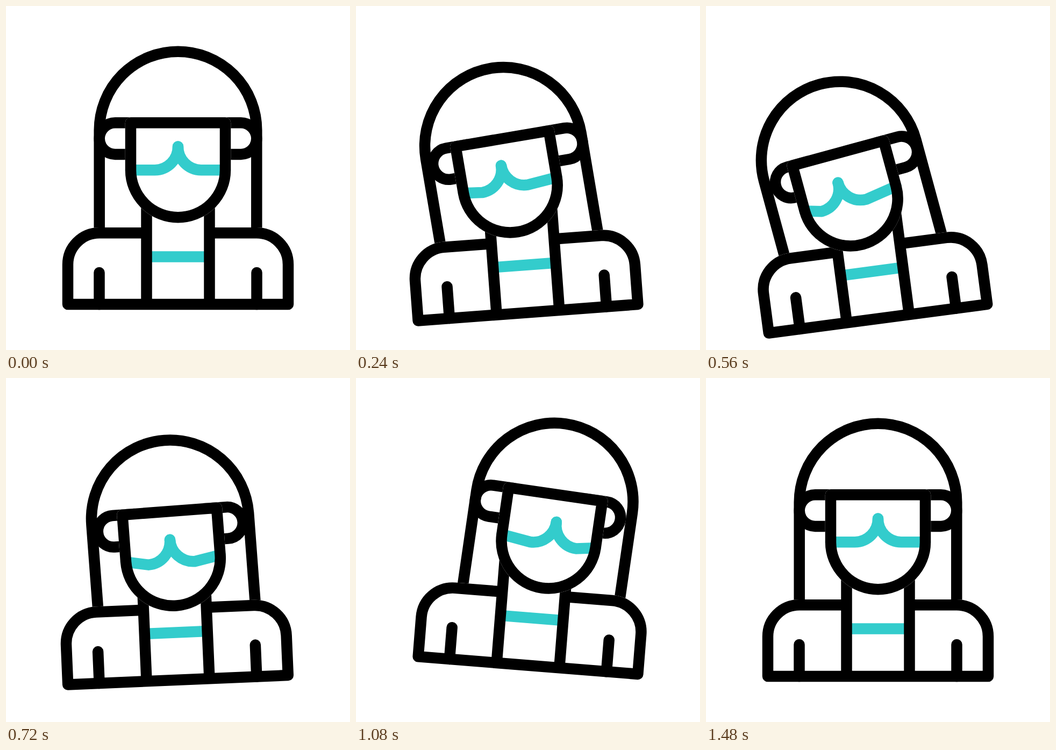
Animation of 640 by 640 pixels, one loop 1.7 s. Source, as an HTML page:

```html
<!DOCTYPE html>
<html lang="en">
<head>
<meta charset="utf-8">
<title>Swaying figure</title>
<style>
  html, body { margin: 0; width: 100%; height: 100%; overflow: hidden; background: #fff; }
  svg { display: block; width: 100vw; height: 100vh; }
  path { fill: none; stroke-width: 20.5; stroke-linejoin: round; }
  .ink { stroke: #000; }
  .solid { fill: #fff; stroke: #fff; }
  .teal { stroke: #33cccc; }
  .cap { stroke-linecap: round; }
</style>
</head>
<body>
<svg viewBox="0 0 640 640">
  <g class="head">
    <path class="ink" d="M173.7 441V231a146.3 146.3 0 0 1 292.6 0V441"/>
    <path id="earL" class="ink" d="M245 217.3H203a29.3 29.3 0 0 0 0 58.6H245"/>
    <path id="earR" class="ink" d="M395 217.3H437a29.3 29.3 0 0 1 0 58.6H395"/>
  </g>
  <g id="body">
    <path class="solid" d="M115 555V481A58.5 58.7 0 0 1 173.5 422.3H466.5A58.5 58.7 0 0 1 525 481V555Z"/>
    <path class="teal" d="M262 466.6H378"/>
    <path class="ink" d="M261.5 422.3H173.5A58.5 58.7 0 0 0 115 481V555H525V481A58.5 58.7 0 0 0 466.5 422.3H378.5"/>
    <path class="ink" d="M261.5 340V555M378.5 340V555"/>
    <path class="ink cap" d="M173.5 496V555M466.5 496V555"/>
  </g>
  <g class="head">
    <path class="solid" d="M232 217.3H408V305.2a88 88 0 0 1 -176 0Z"/>
    <path id="maskL" class="teal cap"/>
    <path id="maskR" class="teal cap"/>
    <path class="ink" d="M232 217.3H408V305.2a88 88 0 0 1 -176 0Z"/>
  </g>
</svg>
<script>
  const LOOP = 1700, STEP = 20;
  const $ = id => document.getElementById(id);
  const heads = document.querySelectorAll('.head');
  const put = (el, value) => el.setAttribute('transform', value);

  // Blend of linear and smooth
  const ease = u => 0.35 * u + 0.65 * u * u * (3 - 2 * u);

  // From rest through two briefly held poses back to rest
  const track = (a, b, t1 = 480, t2 = 960, end = 1480) => {
    const keys = [[0, 0], [t1 - STEP, a], [t1, a], [t2, b], [t2 + STEP, b], [end, 0]];
    return t => {
      const i = keys.findIndex(k => t < k[0]);
      if (i < 0) return 0;
      const [p, v] = keys[i - 1], [q, w] = keys[i];
      return v + (w - v) * ease((t - p) / (q - p));
    };
  };

  const bodyTurn = track(-8.5, 5.1, 500, 980);
  const bodyY = track(30.5, -22.8, 500, 980);
  const headTurn = track(-18.2, 9.6);
  const headX = track(-35.2, 30);
  const headDrop = track(23.5, 23.5, 500, 940, 1360);
  const earIn = track(20.8, 0);
  const earOut = track(0, -23.4);
  const maskX = track(-18.5, 10.5, 460);
  const maskY = track(9, 8, 480, 940, 1440);

  function draw(t) {
    const y = bodyY(t);
    put($('body'), `translate(0 ${y}) rotate(${bodyTurn(t)} 320 555)`);
    const pose = `translate(${headX(t)} ${y + headDrop(t)}) rotate(${headTurn(t)} 320 393)`;
    heads.forEach(h => put(h, pose));
    put($('earL'), `translate(${earIn(t)} 0)`);
    put($('earR'), `translate(${earOut(t)} 0)`);

    // The outer ends stay on the face edge while the nose part slides
    const mx = 320 + maskX(t), my = 305.2 + maskY(t);
    const side = s => `M${320 + s * 88} 305.2L${mx + s * 43} ${my}` +
      `A43.5 43.5 0 0 ${s < 0 ? 0 : 1} ${mx} ${my - 43.7}`;
    $('maskL').setAttribute('d', side(-1));
    $('maskR').setAttribute('d', side(1));
  }

  function tick() {
    const t = performance.now() % LOOP;
    draw(Math.floor(t / STEP) * STEP);
    requestAnimationFrame(tick);
  }
  tick();
</script>
</body>
</html>
```
